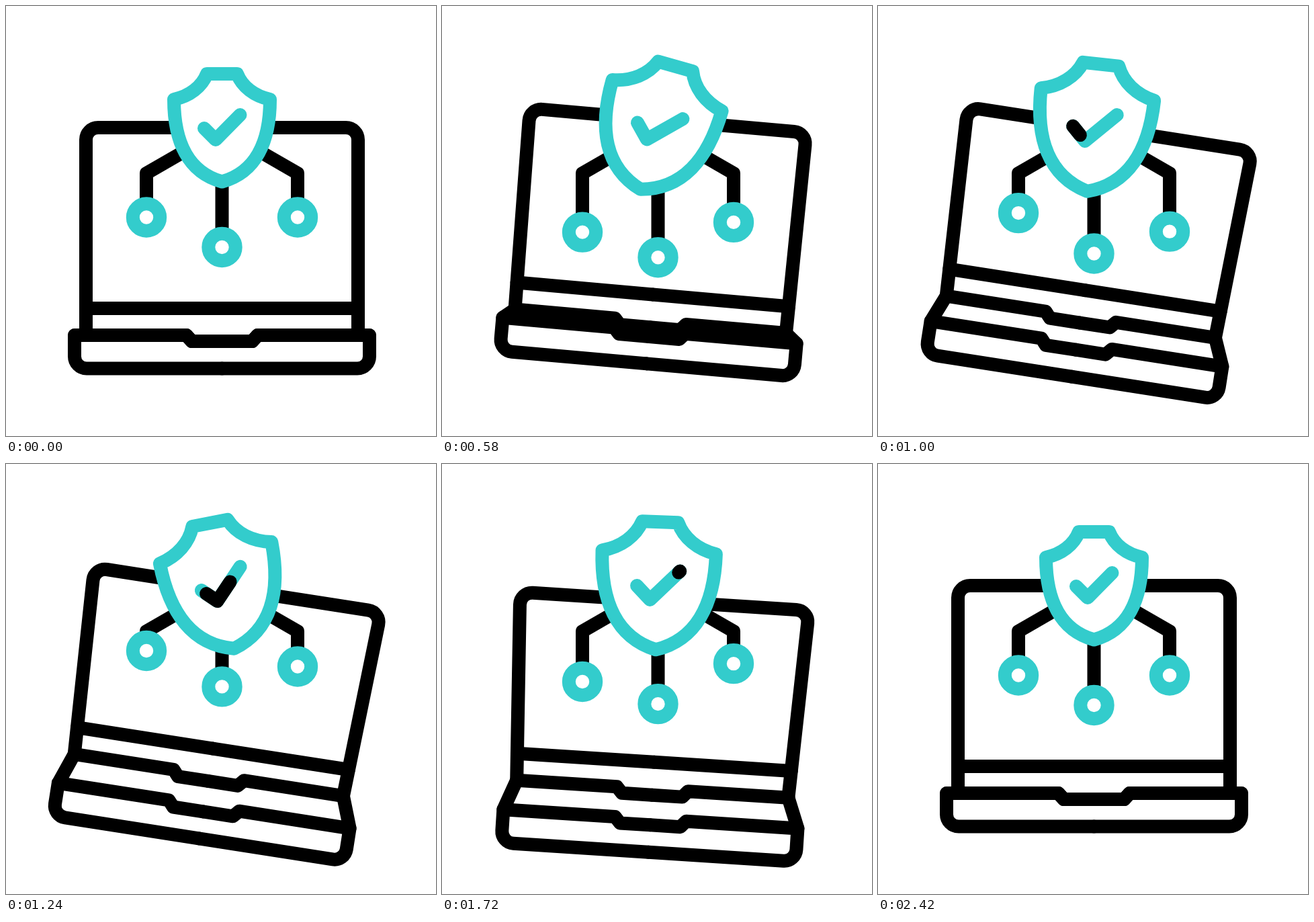
Write an HTML page with a canvas that moves like this. It is 640 px wide and 640 px high and loops after 3 s.

```html
<!DOCTYPE html>
<html lang="en">
<head>
<meta charset="utf-8">
<title>Laptop security</title>
<style>
html, body { margin: 0; width: 100%; height: 100%; overflow: hidden; background: #fff; }
canvas { display: block; }
</style>
</head>
<body>
<canvas id="stage" width="640" height="640"></canvas>
<script>
const ctx = document.getElementById('stage').getContext('2d');
const LOOP = 3000, TEAL = '#33cccc', BLACK = '#000', MID = 321.5, WIDTH = 20;
const rad = deg => deg * Math.PI / 180;

// Sine ease from 0 to 1 between two times.
function ramp(t, from, to) {
  const u = Math.min(1, Math.max(0, (t - from) / (to - from)));
  return (1 - Math.cos(Math.PI * u)) / 2;
}

const tilt = t => 8.85 * ramp(t, 200, 900) - 13 * ramp(t, 1430, 2100) + 4.15 * ramp(t, 2100, 2400);
const lift = t => 19.6 * ramp(t, 1200, 1650) + 6.2 * ramp(t, 1650, 2250) - 25.8 * ramp(t, 200, 750);
const opening = t => 46 * (ramp(t, 200, 1230) - ramp(t, 1650, 2310));
const spin = t => 22.5 * ramp(t, 200, 800) - 33.5 * ramp(t, 800, 1210)
  + 18.5 * ramp(t, 1210, 2020) - 7.5 * ramp(t, 2020, 2400);
const grow = t => 1 + .185 * (ramp(t, 200, 590) - ramp(t, 1900, 2400));
const bob = t => 25.5 * ramp(t, 200, 700) - 63.5 * ramp(t, 700, 1300)
  + 50.5 * ramp(t, 1300, 1800) - 12.5 * ramp(t, 1800, 2210);

function stroke(path, color = BLACK) {
  ctx.strokeStyle = color;
  ctx.stroke(path);
}

// Both halves of a symmetric drawing, with x measured from the middle.
function mirrored(draw) {
  for (const side of [-1, 1]) {
    ctx.save();
    ctx.scale(side, 1);
    draw();
    ctx.restore();
  }
}

function drawLaptop(t) {
  const open = opening(t);
  const hinge = 490, deck = hinge + open, floor = deck + 49.5;
  const top = 181 + open * .65, half = 202.5, wide = half + open * .29;
  const bar = half + (wide - half) * 40 / (hinge - top);
  const notch = (edge, y) => new Path2D(`M${edge} ${y}H53L45 ${y + 9}H0`);

  const lid = new Path2D(`M0 ${top}`);
  lid.arcTo(wide, top, half, hinge, 18);
  lid.lineTo(half, hinge);

  const base = new Path2D(`M${half} ${hinge}L219.5 ${deck}`);
  base.arcTo(219.5, floor, 0, floor, 18);
  base.lineTo(0, floor);

  ctx.save();
  ctx.translate(MID, 362 + lift(t));
  ctx.rotate(rad(tilt(t)));
  ctx.translate(0, -362);
  mirrored(() => {
    stroke(lid);
    stroke(new Path2D(`M0 450H${bar}`));
    stroke(notch(half, hinge));
    stroke(base);
    stroke(notch(219.5, deck));
  });
  ctx.restore();
}

// Three nodes bob one after another, 100 ms apart.
function drawNodes(t) {
  for (const side of [-1, 0, 1]) {
    const x = MID + side * 112.5;
    const y = (side ? 314.5 : 359) + bob(t - (side + 1) * 100);
    stroke(new Path2D(`M${x - side * 70} 208.6L${x} 249V${y}`));
    const ring = new Path2D();
    ring.arc(x, y, 20.2, 0, 2 * Math.PI);
    ctx.fill(ring);
    stroke(ring, TEAL);
  }
}

// Shield and tick are drawn around the shield's own centre.
const shield = new Path2D('M-22.5-80H22.5C30-61 48-47 71.5-42' +
  'C71.5 21 50.5 66.5 0 80.5C-50.5 66.5-71.5 21-71.5-42C-48-47-30-61-22.5-80Z');
const tick = new Path2D('M-26.5 1L-9.5 18L27-19');
const tickLength = Math.hypot(17, 17) + Math.hypot(36.5, 37);

function drawShield(t) {
  const size = grow(t);
  ctx.save();
  ctx.translate(MID, 181);
  ctx.rotate(rad(spin(t)));
  ctx.scale(size, size);
  ctx.lineWidth = WIDTH / size;
  ctx.fill(shield);
  stroke(shield, TEAL);
  stroke(tick, TEAL);

  // Black stretch that runs along the tick.
  const head = ramp(t, 800, 1500), tail = ramp(t, 1100, 1800);
  if (head > tail) {
    ctx.setLineDash([(head - tail) * tickLength, 2 * tickLength]);
    ctx.lineDashOffset = -tail * tickLength;
    stroke(tick);
  }
  ctx.restore();
}

function frame() {
  const t = (performance.now() - start) % LOOP;
  ctx.fillStyle = '#fff';
  ctx.fillRect(0, 0, 640, 640);
  ctx.lineWidth = WIDTH;
  ctx.lineCap = ctx.lineJoin = 'round';
  drawLaptop(t);
  drawNodes(t);
  drawShield(t);
  requestAnimationFrame(frame);
}

const start = performance.now();
frame();
</script>
</body>
</html>
```
